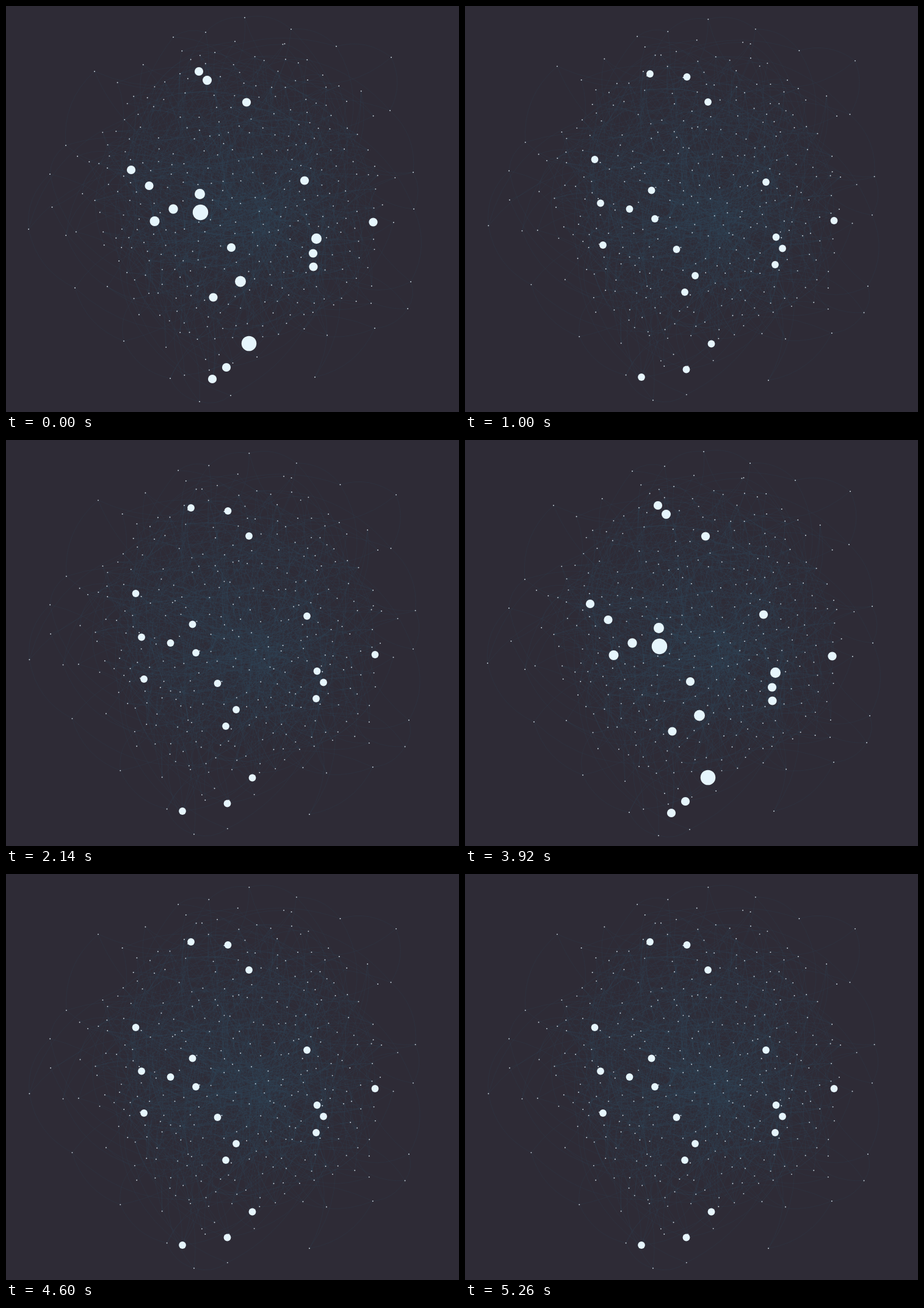
An HTML page with a canvas that plays this animation: 742 by 664 pixels, repeating every 5.7 s.

```html
<!DOCTYPE html>
<html lang="en">
<head>
<meta charset="utf-8">
<title>Network</title>
<style>
html, body { margin: 0; width: 100%; height: 100%; overflow: hidden; background: #2e2b36; }
canvas { display: block; }
</style>
</head>
<body>
<canvas id="stage" width="742" height="664"></canvas>
<script>
const ctx = document.getElementById('stage').getContext('2d');
const W = 742, H = 664, LOOP = 5700, CUTS = [1000, 2900, 4600];
const BG = '#2e2b36', LINK = 'rgba(46, 78, 98, .27)', DOT = '#c9d2da', HUB = '#e6f5fc';
const CENTER = [380, 322], TURN = .025;

let seed = 20177;
function rand() {
  seed = (seed + 0x6d2b79f5) | 0;
  let t = Math.imul(seed ^ (seed >>> 15), 1 | seed);
  t = (t + Math.imul(t ^ (t >>> 7), 61 | t)) ^ t;
  return ((t ^ (t >>> 14)) >>> 0) / 4294967296;
}
const spread = d => (rand() * 2 - 1) * d;
const dist = (a, b) => Math.hypot(a[0] - b[0], a[1] - b[1]);
const mix = (a, b, k) => a.map((v, i) => v + (b[i] - v) * k);

// A node holds its place in both layouts; the second one is turned slightly clockwise
function node(p, jitter) {
  const dx = p[0] - CENTER[0], dy = p[1] - CENTER[1], c = Math.cos(TURN), s = Math.sin(TURN);
  const q = [CENTER[0] + dx * c - dy * s + spread(jitter), CENTER[1] + dx * s + dy * c + spread(jitter)];
  return { at: [p, q] };
}

// Large nodes: first place, second place, first radius
const hubs = [
  [316, 107, 303, 111], [329.5, 121.5, 363.5, 116, 7.5], [394, 157.5, 398, 157],
  [205, 268, 212.5, 251], [234.5, 294, 222, 322.5], [489, 285.5, 493, 288],
  [317.5, 307.5, 305.5, 301.5, 8.5], [274, 332, 269.5, 332, 7.7], [318.5, 337.5, 311, 348, 12.7],
  [243.5, 352, 226, 391, 8], [601.5, 353.5, 604.5, 351], [508.5, 380.5, 509.5, 378, 8.5],
  [503, 404.5, 520, 396.5], [503.5, 426.5, 508, 423], [369, 395, 346.5, 398],
  [384, 450.5, 377, 441, 9], [339.5, 476.5, 360, 468], [398, 552, 403.5, 552.5, 12.3],
  [361, 591, 362.5, 594.5], [338, 610, 289, 607]
].map(([x, y, x2, y2, r = 7.1]) => ({ at: [[x, y], [x2, y2]], r: [r, 5.9] }));

// Outermost tips, clockwise from the top
const tips = [
  [391, 19], [467, 38], [541, 66], [631, 84], [629, 171], [667, 272], [668, 332], [663, 451],
  [658, 495], [604, 527], [506, 607], [368, 637], [317, 647], [269, 609], [193, 548],
  [113, 461], [37, 365], [72, 275], [98, 228], [145, 107], [274, 51], [327, 43]
];
const rim = tips.map(p => node(p, 3));

// A loose fringe just inside the tips
const fringe = tips.flatMap((p, i) => [0, 1].map(() => {
  const edge = mix(p, tips[(i + 1) % tips.length], rand());
  return node(mix(edge, CENTER, .05 + rand() * .2), 6);
}));

// Scatter the core evenly inside an oval
const core = [];
for (let tries = 0; tries < 9000 && core.length < 285; tries++) {
  const a = rand() * Math.PI * 2, r = Math.sqrt(rand());
  const p = [380 + Math.cos(a) * r * 236, 313 + Math.sin(a) * r * 243];
  if ([...core, ...fringe, ...hubs].some(n => dist(n.at[0], p) < 15)) continue;
  core.push(node(p, 7));
}
const focus = [400, 335];
core.sort((a, b) => dist(a.at[0], focus) - dist(b.at[0], focus));

// A higher bias prefers nodes close to the focus
const links = [];
const pick = bias => core[Math.floor(core.length * rand() ** bias)];
function link(a, reach, bias, count = 1) {
  for (let tries = 0; tries < 12 * count && count; tries++) {
    const b = pick(bias);
    if (b === a || dist(a.at[0], b.at[0]) > reach) continue;
    links.push(rand() < .5 ? [a, b] : [b, a]);
    count--;
  }
}
for (let i = 0; i < 1000; i++) link(pick(1.15), 280, 1.6);
for (const n of hubs) link(n, 260, 1.2, 5);
for (const n of fringe) link(n, 240, .8, 3);
rim.forEach((n, i) => {
  const next = rim[(i + 1) % rim.length];
  if (dist(n.at[0], next.at[0]) < 130) links.push([n, next]);
  link(n, 280, .7, 2);
});

function disc([x, y], r) {
  ctx.beginPath();
  ctx.arc(x, y, r, 0, Math.PI * 2);
  ctx.fill();
}

function draw(s) {
  ctx.fillStyle = BG;
  ctx.fillRect(0, 0, W, H);
  ctx.strokeStyle = LINK;
  ctx.lineWidth = .75;
  for (const [a, b] of links) {
    const [x1, y1] = a.at[s], [x2, y2] = b.at[s];
    ctx.beginPath();
    ctx.moveTo(x1, y1);
    ctx.quadraticCurveTo((x1 + x2) / 2 + (y2 - y1) / 4, (y1 + y2) / 2 + (x1 - x2) / 4, x2, y2);
    ctx.stroke();
  }
  ctx.fillStyle = DOT;
  for (const n of [...core, ...fringe, ...rim]) disc(n.at[s], .95);
  ctx.fillStyle = HUB;
  for (const n of hubs) disc(n.at[s], n.r[s]);
}

const start = performance.now();
let shown = -1;
function tick() {
  const t = (performance.now() - start) % LOOP;
  const state = CUTS.filter(c => t >= c).length % 2;
  if (state !== shown) draw(shown = state);
  requestAnimationFrame(tick);
}
tick();
</script>
</body>
</html>
```
